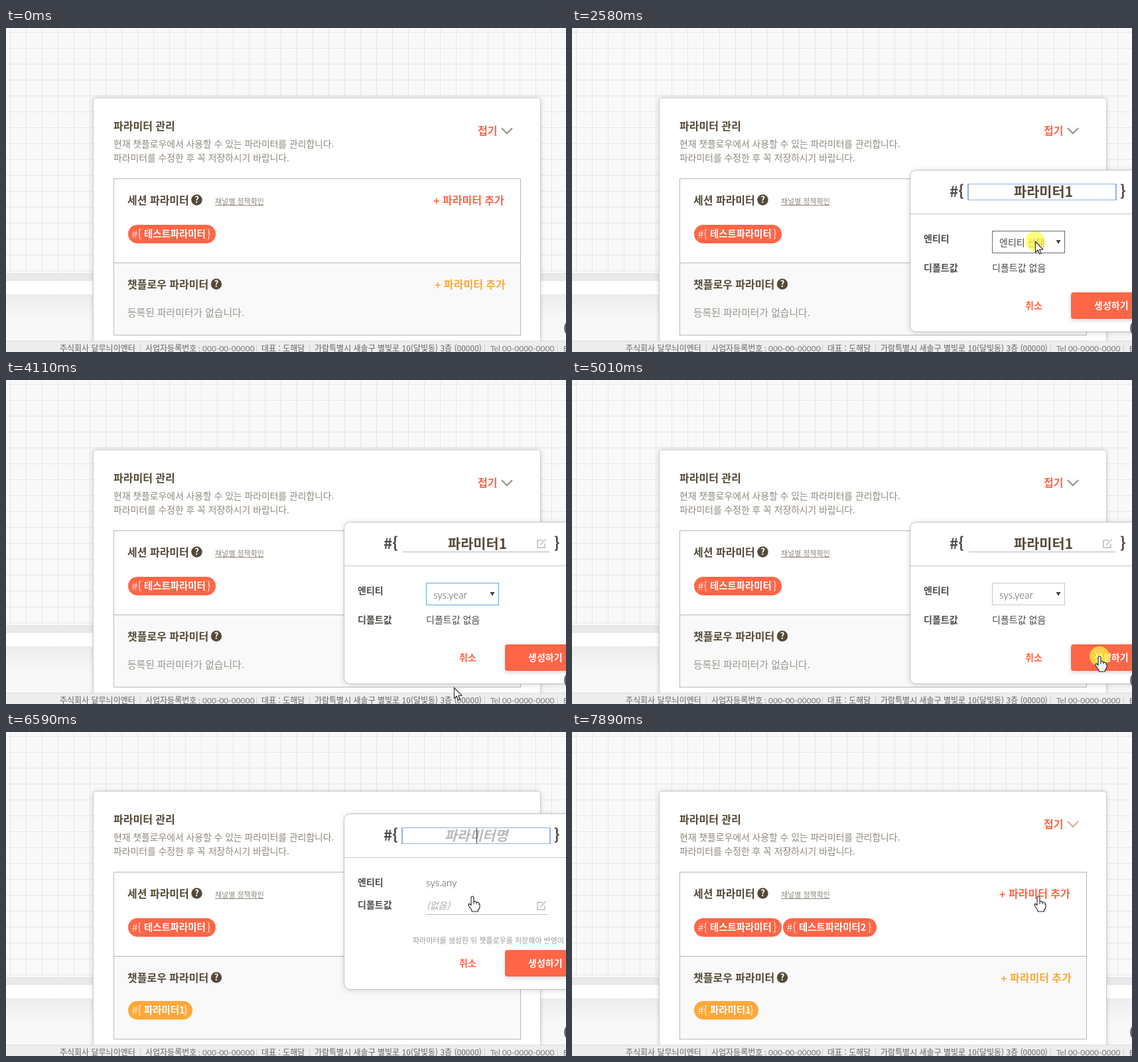
Recreate the animation shown at these times as an HTML page. Size 844 px wide and 489 px high, loop 7990 ms.

```html
<!DOCTYPE html>
<html lang="ko">
<head>
<meta charset="utf-8">
<style>
html, body { margin: 0; width: 100%; height: 100%; overflow: hidden; background: #f9f9f9; }
svg { display: block; width: 844px; height: 489px; }
text { font-family: "Noto Sans CJK KR", "Noto Sans KR", "Noto Sans CJK", sans-serif; white-space: pre; }
.latin { font-family: Lato, "Noto Sans CJK KR", sans-serif; font-weight: 300; }
.panel { filter: drop-shadow(0 0 3px rgba(0,0,0,.17)); }
.dialog { filter: drop-shadow(0 1px 4px rgba(0,0,0,.15)); }
.button { filter: drop-shadow(0 2px 3px rgba(0,0,0,.18)); }
</style>
</head>
<body>
<svg viewBox="0 0 844 489">
  <defs>
    <linearGradient id="fade" x2="0" y2="1">
      <stop stop-color="#ececec"/><stop offset=".5" stop-color="#f8f8f8"/>
    </linearGradient>
  </defs>
  <rect width="844" height="489" fill="#f9f9f9"/>
  <path id="grid" stroke="#e6e6e6"/>
  <rect y="370" width="844" height="12" fill="#e9e9e9"/>
  <path d="M0 370.5H844" stroke="#e0e0e0"/>
  <rect y="382" width="844" height="20" fill="#fff"/>
  <rect y="402" width="844" height="70" fill="url(#fade)"/>
  <g id="panel"></g>
  <g id="footer"></g>
  <g id="dialog"></g>
  <circle cx="855" cy="453" r="14" fill="#666"/>
  <g id="pointer"></g>
</svg>
<script>
const LOOP = 7990;
const CORAL = '#ff6647', ORANGE = '#ffa83a', BROWN = '#544a37', GRAY = '#8f887c', INK = '#4c4a47';
const $ = id => document.getElementById(id);
const between = (t, a, b) => t >= a && t < b;
const ramp = (t, a, b) => Math.min(1, Math.max(0, (t - a) / (b - a)));

// y is the visual centre of the line
const text = (x, y, s, size, fill, extra = '') =>
  `<text x="${x}" y="${y + size * .37}" font-size="${size}" fill="${fill}" ${extra}>${s}</text>`;
const bold = (x, y, s, size, fill, extra = '') => text(x, y, s, size, fill, 'font-weight="700" ' + extra);
const latin = (x, y, s, size, fill) => text(x, y, s, size, fill, 'class="latin"');
const rect = (x, y, w, h, fill, stroke = 'none', r = 0, extra = '') =>
  `<rect x="${x}" y="${y}" width="${w}" height="${h}" rx="${r}" fill="${fill}" stroke="${stroke}" ${extra}/>`;
const line = (d, stroke, width = 1) => `<path d="${d}" fill="none" stroke="${stroke}" stroke-width="${width}"/>`;

function gridPath() {
  let d = '';
  for (let x = 6.5; x < 844; x += 24) d += `M${x} 0V370`;
  for (let y = 6.5; y < 370; y += 24) d += `M0 ${y}H844`;
  return d;
}

const help = (x, y) => `<circle cx="${x}" cy="${y}" r="8.2" fill="${BROWN}"/>` +
  bold(x, y, '?', 13.5, '#fff', 'text-anchor="middle"');
const addLink = (x, y, fill) => bold(x, y + 1, '+', 16, fill) + bold(x + 14, y, '파라미터 추가', 16, fill);
const pill = (x, y, w, name, fill) => rect(x, y - 14, w, 28, fill, 'none', 14) +
  text(x + 5.5, y, '#{', 16, '#fff', 'opacity=".8"') + bold(x + 24, y, name, 14.4, '#fff') +
  text(x + w - 13, y, '}', 16, '#fff', 'opacity=".8"');
const editIcon = (x, y) => `<g transform="translate(${x} ${y})">` +
  line('M2-5H-6V6H5V0M-2 2L6.5-6.5', '#bdbdbd', 1.5) + '</g>';

function drawPanel(t) {
  const grown = t >= 5210, y = grown ? -16 : 0;
  const added = t >= 7760;
  return rect(131.5, 105.5 + y, 674, 420, '#fff', '#cfcecc', 4, 'class="panel"') +
    bold(162, 148 + y, '파라미터 관리', 16, BROWN) +
    text(162, 175 + y, '현재 챗플로우에서 사용할 수 있는 파라미터를 관리합니다.', 13.83, GRAY) +
    text(162, 196 + y, '파라미터를 수정한 후 꼭 저장하시기 바랍니다.', 13.83, GRAY) +
    bold(711, 155 + y, '접기', 16, CORAL) +
    line(`M747 ${151 + y}l8 8l8-8`, added ? '#dfa596' : '#948d84', 2) +
    rect(162.5, 227.5 + y, 613, 236 - y, '#fff', '#b9b7b3') +
    rect(162.5, 354.5 + y, 613, 109 - y, '#f9f9f9', '#b9b7b3') +
    bold(183, 260 + y, '세션 파라미터', 16, BROWN) + help(287.5, 259.5 + y) +
    text(315, 262 + y, '채널별 정책확인', 11, GRAY) + line(`M315 ${267.5 + y}H388`, GRAY) +
    addLink(644, 260 + y, CORAL) +
    pill(184, 311 + y, 132, '테스트파라미터', CORAL) +
    (added ? pill(318, 295, 141, '테스트파라미터2', CORAL) : '') +
    bold(183, 387 + y, '챗플로우 파라미터', 16, BROWN) + help(317, 386.5 + y) +
    addLink(646, 387 + y, ORANGE) +
    (grown ? pill(184, 420, 97, '파라미터1', ORANGE)
           : text(183, 430, '등록된 파라미터가 없습니다.', 14.8, '#9b968d'));
}

function drawFooter() {
  const words = [
    [81, '주식회사 달무늬이엔터'], [210, '사업자등록번호'],
    [385, '대표 : 도해담'], [465, '가람특별시 새솔구 별빛로 10(달빛동) 3층 (00000)']];
  const codes = [[290, ': 000-00-00000'], [730, 'Tel 00-0000-0000'], [840, 'E']];
  return rect(0, 472, 844, 17, '#ededed') + line('M0 472.5H844', '#dcdcdc') +
    words.map(([x, s]) => text(x, 483.5, s, 12, '#66635f')).join('') +
    codes.map(([x, s]) => text(x, 483.5, s, 12, '#777', 'style="font-family:Lato,sans-serif"')).join('') +
    [202, 377, 457, 721, 831].map(x => line(`M${x}.5 478V489`, '#cfcfcf')).join('');
}

// Syllables as they form while being typed
const words = [
  { start: 1660, step: 85, steps: 'ㅍ 파 팔 파라 파람 파라미 파라밑 파라미터 파라미터1' },
  { start: 6880, step: 53, steps: 'ㅌ 테 텟 테스 테슽 테스트 테스틒 테스트파 테스트팔 테스트파라 테스트파람 ' +
    '테스트파라미 테스트파라밑 테스트파라미터 테스트파라미터2' }
].map(w => ({ ...w, steps: w.steps.split(' ') }));

function typed(t, { start, step, steps }) {
  return t < start ? '' : steps[Math.min(steps.length - 1, Math.floor((t - start) / step))];
}

function nameField(value, focused, caret, y) {
  const size = 20.8, cx = 708.5;
  const width = [...value].reduce((w, c) => w + (c < 'A' ? .58 : .92) * size, 0);
  const shift = value.endsWith('1') ? 2 : 0;
  const middle = 'text-anchor="middle"';
  const blue = '#93b0ee';
  return bold(569, y + 247, '#{', 22.5, INK) + bold(826, y + 247, '}', 22.5, INK) +
    (focused ? rect(596.5, y + 235.5, 224, 24, '#fff', blue) +
               line(`M597 ${y + 235}v25M820 ${y + 235}v25`, blue, 2)
             : line(`M598 ${y + 259.5}H819`, '#b5b5b5') + editIcon(807, y + 247)) +
    (value ? bold(cx + shift, y + 247, value, size, BROWN, middle)
           : bold(cx, y + 247, '파라미터명', size, '#b9b9bb', middle + ' font-style="italic"')) +
    (caret ? line(`M${Math.round(cx + width / 2) + .5} ${y + 236}v23`, '#333') : '');
}

const dialogBox = (y, height) =>
  rect(509.5, y + 214.5, 370, height, '#fff', '#c4c3c1', 9, 'class="dialog"') +
  line(`M510 ${y + 280.5}H844`, '#c9c8c6');
const buttons = y => bold(683, y, '취소', 14, CORAL) +
  rect(752, y - 20, 120, 40, CORAL, 'none', 4, 'class="button"') + bold(787, y, '생성하기', 14, '#fff');

const optionLabel = (x, y, s, fill) =>
  s.startsWith('sys') ? latin(x, y, s, 15, fill) : text(x, y, s, 14, fill);

function dropdown(pointerY) {
  const names = ['엔티티 선택', 'sys.any', 'sys.date', 'sys.time', 'sys.number', 'sys.month', 'sys.year'];
  const h = 19.5, hover = Math.min(6, Math.max(0, Math.floor((pointerY - 340) / h)));
  return rect(633.5, 340.5, 109, h * names.length, '#fff', '#8a8a8a') +
    names.map((s, i) => (i === hover ? rect(634, 341 + i * h, 108, h - .5, '#1e90ff') : '') +
      optionLabel(644, 350 + i * h, s, i === hover ? '#fff' : INK)).join('');
}

function entityDialog(t, pointerY) {
  const border = t < 2480 ? '#c8c8c8' : t < 4110 ? '#6a6a6a' : t < 5010 ? '#62a9dc' : '#c8c8c8';
  return dialogBox(0, 244) +
    nameField(typed(t, words[0]), t < 2680, t < 2480, 0) +
    bold(530, 318, '엔티티', 14, INK) + rect(633.5, 306.5, 109, 33, '#fff', border) +
    optionLabel(644, 324, t < 4010 ? '엔티티 선택' : 'sys.year', INK) +
    '<path d="M729.5 320h7l-3.5 6z" fill="#444"/>' +
    bold(530, 362, '디폴트값', 14, INK) + text(633, 362, '디폴트값 없음', 14, INK) + buttons(419) +
    (between(t, 2680, 4010) ? dropdown(pointerY) : '');
}

function sessionDialog(t) {
  return dialogBox(-91, 265) + nameField(typed(t, words[1]), true, true, -91) +
    bold(530, 227, '엔티티', 14, INK) + latin(633, 227, 'sys.any', 15, INK) +
    bold(530, 261, '디폴트값', 14, INK) +
    text(634, 262, '(없음)', 14, '#aaa', 'font-style="italic"') +
    line('M633 275.5H816', '#bbb') + editIcon(807, 262) +
    text(613, 315, '파라미터를 생성한 뒤 챗플로우를 저장해야 반영이 됩니다.', 11, '#999') + buttons(349);
}

function drawDialog(t, pointerY) {
  const first = ramp(t, 940, 1040) - ramp(t, 5110, 5210);
  const second = ramp(t, 6390, 6490) - ramp(t, 7690, 7790);
  const layer = (opacity, body) => `<g opacity="${opacity}">${body}</g>`;
  return first > 0 ? layer(first, entityDialog(t, pointerY)) :
    second > 0 ? layer(second, sessionDialog(t)) : '';
}

const path = [
  [40, 712, 470], [360, 704, 327], [740, 736, 378], [900, 736, 379], [1300, 701, 382], [1420, 701, 382],
  [1590, 701, 377], [2380, 698, 340], [2540, 698, 322], [2700, 698, 322], [3210, 682, 430],
  [3600, 675, 464], [4310, 675, 464], [4910, 795, 417], [5110, 795, 417], [5450, 741, 369],
  [5600, 741, 369], [6090, 703, 248], [LOOP, 703, 248]];
const clicks = [800, 2540, 3710, 4960, 6190];
const hands = [[640, 1040], [4740, 5160], [5330, 5700], [5980, LOOP]];

function pointerAt(t) {
  const i = Math.max(1, path.findIndex(p => p[0] > t));
  const [a, b] = [path[i - 1], path[i]];
  const k = ramp(t, a[0], b[0]), e = k * k * (3 - 2 * k);
  return { x: Math.round(a[1] + (b[1] - a[1]) * e), y: Math.round(a[2] + (b[2] - a[2]) * e) };
}

function drawPointer(t, { x, y }) {
  if (t < 40 || between(t, 1660, 2430)) return '';
  const hand = hands.some(([a, b]) => between(t, a, b));
  const click = clicks.some(c => between(t, c, c + 140));
  const shape = hand
    ? 'M-2 2a2 2 0 0 1 4 0V8q3-1 4 1q3-.5 4 1.5q1 .2 1 2V16q0 3-2.5 4.5V23H-1V20.5Q-4 17-6 13.5q-.5-2.5 2-2L-2 13.5Z'
    : 'M.5 .5V16.5L4.2 13.1L6.7 19L9.2 17.9L6.7 12.2H12Z';
  return `<g transform="translate(${x} ${y})">` +
    (click ? '<circle r="15" fill="#ffff46" opacity=".7"/>' : '') +
    `<path d="${shape}" fill="#fff" stroke="#222" stroke-width="1.1" stroke-linejoin="round"/>` +
    (hand ? line('M2 8v4M6 9v3M10 11v2', '#222') : '') + '</g>';
}

const shown = {};
function put(id, markup) {
  if (shown[id] !== markup) $(id).innerHTML = shown[id] = markup;
}

function render(t) {
  const pointer = pointerAt(t);
  put('panel', drawPanel(t));
  put('dialog', drawDialog(t, pointer.y));
  put('pointer', drawPointer(t, pointer));
}

$('grid').setAttribute('d', gridPath());
put('footer', drawFooter());
const begin = performance.now();
function tick() {
  render((performance.now() - begin) % LOOP);
  requestAnimationFrame(tick);
}
tick();
</script>
</body>
</html>
```
